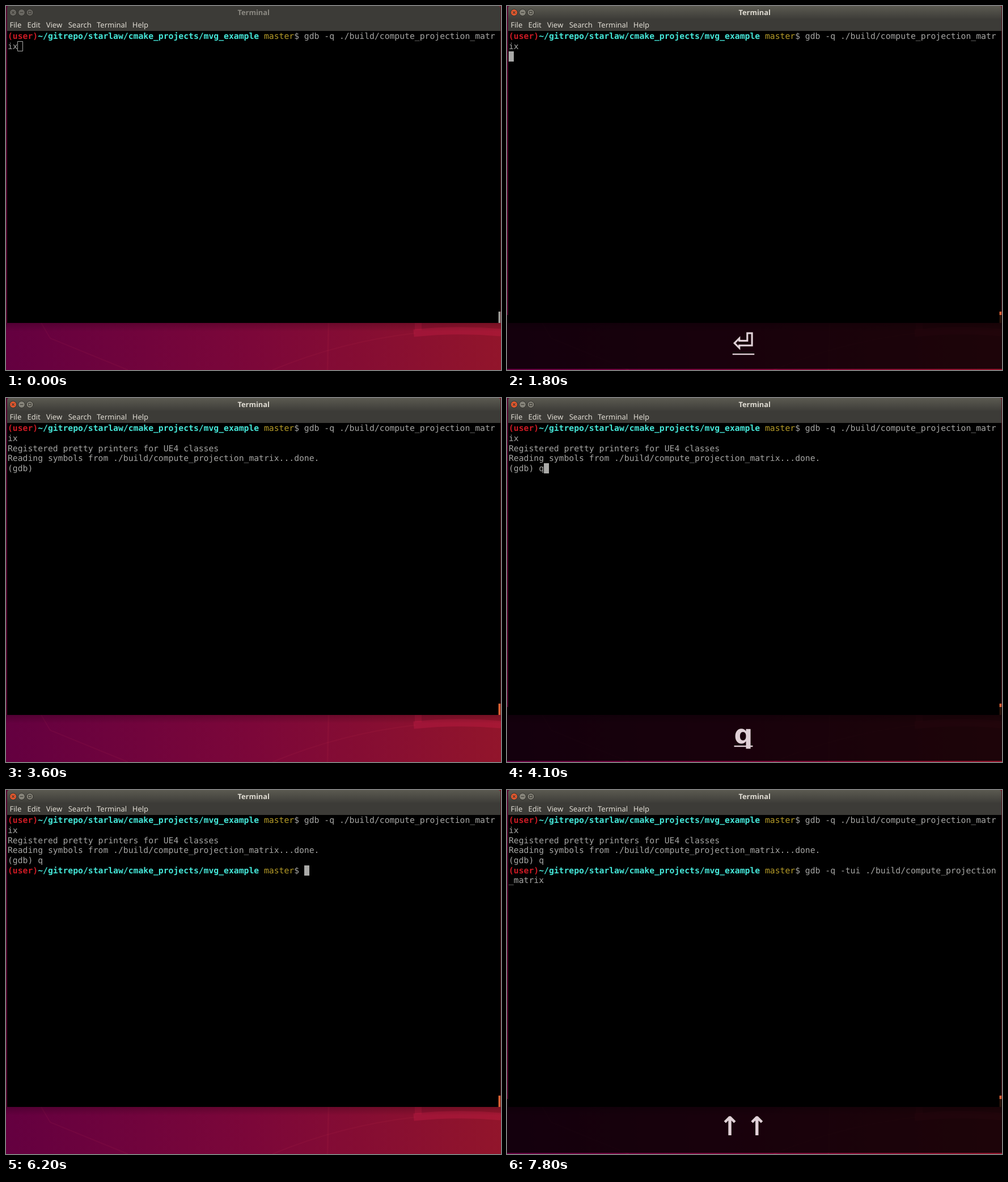
Animation of 873 by 642 pixels, one loop 8000 ms. Source, as an HTML page with a canvas:

```html
<!DOCTYPE html>
<html lang="en">
<head>
<meta charset="utf-8">
<title>Terminal</title>
<style>
html, body { margin: 0; width: 873px; height: 642px; overflow: hidden; background: #000; }
canvas { display: block; }
</style>
</head>
<body>
<canvas id="stage" width="873" height="642"></canvas>
<script>
const W = 873, H = 642, LOOP = 8000;
const ctx = document.getElementById('stage').getContext('2d');
ctx.textRendering = 'geometricPrecision';

const CELL_W = 8.862, CELL_H = 17.72, LEFT = 3, TOP = 44.4;
const GREY = '#a6a6a4', RED = '#cc1a24', CYAN = '#45e6d8', YELLOW = '#b59b28';
const KEY_COLOR = '#e0d1d7';
const WINDOW_BOTTOM = 559;
const PROMPT = '(user)~/gitrepo/starlaw/cmake_projects/mvg_example master$ ';
const PLAIN = 'gdb -q ./build/compute_projection_matrix';
const TUI = 'gdb -q -tui ./build/compute_projection_matrix';
const COLUMNS = 97;

// Each step overrides part of the state; cursor is [row, column] or null.
const steps = [
  [0, { focus: false, cursor: [1, 2], lines: 0, gdb: null, prompt: false, command: '', keys: '', underline: false }],
  [800, { focus: true }],
  [1400, { cursor: null }],
  [1800, { cursor: [2, 0], keys: '⏎', underline: true }],
  [1900, { lines: 1, cursor: [3, 0] }],
  [2000, { underline: false }],
  [2200, { lines: 2, cursor: [4, 0] }],
  [2500, { cursor: null }],
  [3100, { gdb: '(gdb) ', cursor: [4, 6] }],
  [3300, { keys: '' }],
  [3600, { cursor: null }],
  [4100, { gdb: '(gdb) q', cursor: [4, 7], keys: 'q', underline: true }],
  [4300, { underline: false }],
  [4700, { cursor: [5, 0], keys: 'q⏎', underline: true }],
  [4800, { prompt: true, cursor: [5, 59] }],
  [4900, { underline: false }],
  [5300, { cursor: null }],
  [6000, { cursor: [5, 59] }],
  [6200, { keys: '' }],
  [6500, { keys: '↑', underline: true }],
  [6600, { cursor: null }],
  [6800, { command: PLAIN, cursor: [6, 2], underline: false }],
  [6900, { keys: '↑↑', underline: true }],
  [7100, { command: TUI, cursor: [6, 7] }],
  [7200, { underline: false }],
  [7800, { cursor: null }]
];

function stateAt(time) {
  return Object.assign({}, ...steps.filter(s => s[0] <= time).map(s => s[1]));
}

function rect(x, y, w, h, fill) {
  ctx.fillStyle = fill;
  ctx.fillRect(x, y, w, h);
}

function gradient(x0, y0, x1, y1, ...colors) {
  const g = ctx.createLinearGradient(x0, y0, x1, y1);
  colors.forEach((c, i) => g.addColorStop(i / (colors.length - 1), c));
  return g;
}

function label(str, x, y, font, color, align = 'left') {
  ctx.font = font;
  ctx.fillStyle = color;
  ctx.textAlign = align;
  ctx.fillText(str, x, y);
}

function line(color, width, draw) {
  ctx.strokeStyle = color;
  ctx.lineWidth = width;
  ctx.beginPath();
  draw();
  ctx.stroke();
}

function drawWallpaper() {
  rect(0, 0, W, H, gradient(0, 620, W, 560, '#640040', '#7c0739', '#92152b'));
  const faint = 'rgba(255,90,110,0.06)';
  line(faint, 3, () => { ctx.moveTo(569, 559); ctx.lineTo(567, H); });
  line(faint, 2, () => { ctx.moveTo(470, H); ctx.quadraticCurveTo(590, 592, 722, 577); });
  line(faint, 2, () => { ctx.moveTo(62, 559); ctx.lineTo(78, 586); ctx.lineTo(215, H); });
  line('rgba(215,35,75,0.28)', 13, () => { ctx.moveTo(719, 577); ctx.quadraticCurveTo(795, 569, W, 576); });
  rect(721, 559, 12, 13, 'rgba(215,35,75,0.22)');
  rect(0, WINDOW_BOTTOM, W, 15, gradient(0, WINDOW_BOTTOM, 0, 574, 'rgba(0,0,0,0.2)', 'rgba(0,0,0,0)'));
  rect(0, 0, 3, WINDOW_BOTTOM, '#560630');
  rect(872, 0, 1, WINDOW_BOTTOM, '#54121d');
}

function drawButton(x, fill, icon) {
  ctx.fillStyle = fill;
  ctx.beginPath();
  ctx.arc(x, 11.5, 5.7, 0, Math.PI * 2);
  ctx.fill();
  line('#33322e', 1, () => ctx.arc(x, 11.5, 5.9, 0, Math.PI * 2));
  line('#3a3833', 1.1, icon);
}

function drawWindow(focus) {
  ctx.fillStyle = focus ? gradient(0, 0, 0, 24, '#5b5a51', '#3c3b37') : '#3c3b37';
  ctx.beginPath();
  ctx.roundRect(2, 0, 870, 30, [4, 4, 0, 0]);
  ctx.fill();
  rect(2, 23, 870, 21, '#3c3b37');
  rect(2, 44, 870, WINDOW_BOTTOM - 44, '#000');

  const grey = focus ? '#86847a' : '#6b6963';
  drawButton(12.5, focus ? '#e4582d' : grey, () => {
    ctx.moveTo(10.3, 9.3); ctx.lineTo(14.7, 13.7);
    ctx.moveTo(14.7, 9.3); ctx.lineTo(10.3, 13.7);
  });
  drawButton(27.5, grey, () => { ctx.moveTo(24.7, 11.5); ctx.lineTo(30.3, 11.5); });
  drawButton(42, grey, () => ctx.rect(39.7, 9.4, 4.6, 4.2));

  label('Terminal', 436.7, 16, 'bold 12.8px "Noto Sans", sans-serif', focus ? '#dfdbd2' : '#8b8982', 'center');
  const menu = { File: 6.5, Edit: 37.5, View: 70.7, Search: 109.7, Terminal: 160, Help: 222.8 };
  for (const item in menu) {
    label(item, menu[item], 38.2, '13px "Noto Sans", sans-serif', '#dfdbd2');
  }
  rect(868.5, 539, 3.5, 20, focus ? '#df6234' : '#a09e99');
}

function write(row, col, str, color = GREY, bold = false) {
  const font = (bold ? 'bold ' : '') + '14.72px "DejaVu Sans Mono", monospace';
  [...str].forEach((ch, i) => {
    label(ch, LEFT + (col + i) * CELL_W, TOP + row * CELL_H + 13.7, font, color);
  });
}

function writePrompt(row, command) {
  write(row, 0, PROMPT.slice(0, 6), RED, true);
  write(row, 6, PROMPT.slice(6, 50), CYAN, true);
  write(row, 51, 'master', YELLOW);
  write(row, 57, '$');
  const room = COLUMNS - PROMPT.length;
  write(row, PROMPT.length, command.slice(0, room));
  write(row + 1, 0, command.slice(room));
}

function drawCursor([row, col], solid) {
  const x = Math.round(LEFT + col * CELL_W), y = Math.round(TOP + row * CELL_H);
  if (solid) rect(x, y, 9, 18, '#aaaaa8');
  else line('#aaaaa8', 1, () => ctx.rect(x - 0.5, y + 0.5, 9, 17));
}

function drawKeys(keys, underline) {
  rect(0, 545, W, 95, 'rgba(0,0,0,0.8)');
  const size = 46, gap = size * 0.2;
  const font = `bold ${size}px "DejaVu Sans", sans-serif`;
  ctx.font = font;
  const glyphs = [...keys];
  const widths = glyphs.map(g => ctx.measureText(g).width);
  const total = widths.reduce((a, b) => a + b, gap * (glyphs.length - 1));
  let x = 417 - total / 2;
  glyphs.forEach((g, i) => {
    label(g, x, 609.3, font, KEY_COLOR);
    if (underline && i === glyphs.length - 1) rect(x, 613, widths[i], 2.3, KEY_COLOR);
    x += widths[i] + gap;
  });
}

function draw(time) {
  const s = stateAt(time);
  ctx.clearRect(0, 0, W, H);
  drawWallpaper();
  drawWindow(s.focus);
  writePrompt(0, PLAIN);
  if (s.lines > 0) write(2, 0, 'Registered pretty printers for UE4 classes');
  if (s.lines > 1) write(3, 0, 'Reading symbols from ./build/compute_projection_matrix...done.');
  if (s.gdb) write(4, 0, s.gdb);
  if (s.prompt) writePrompt(5, s.command);
  if (s.cursor) drawCursor(s.cursor, s.focus);
  if (s.keys) drawKeys(s.keys, s.underline);
}

const start = performance.now();
function tick() {
  draw((performance.now() - start) % LOOP);
  requestAnimationFrame(tick);
}
tick();
</script>
</body>
</html>
```
